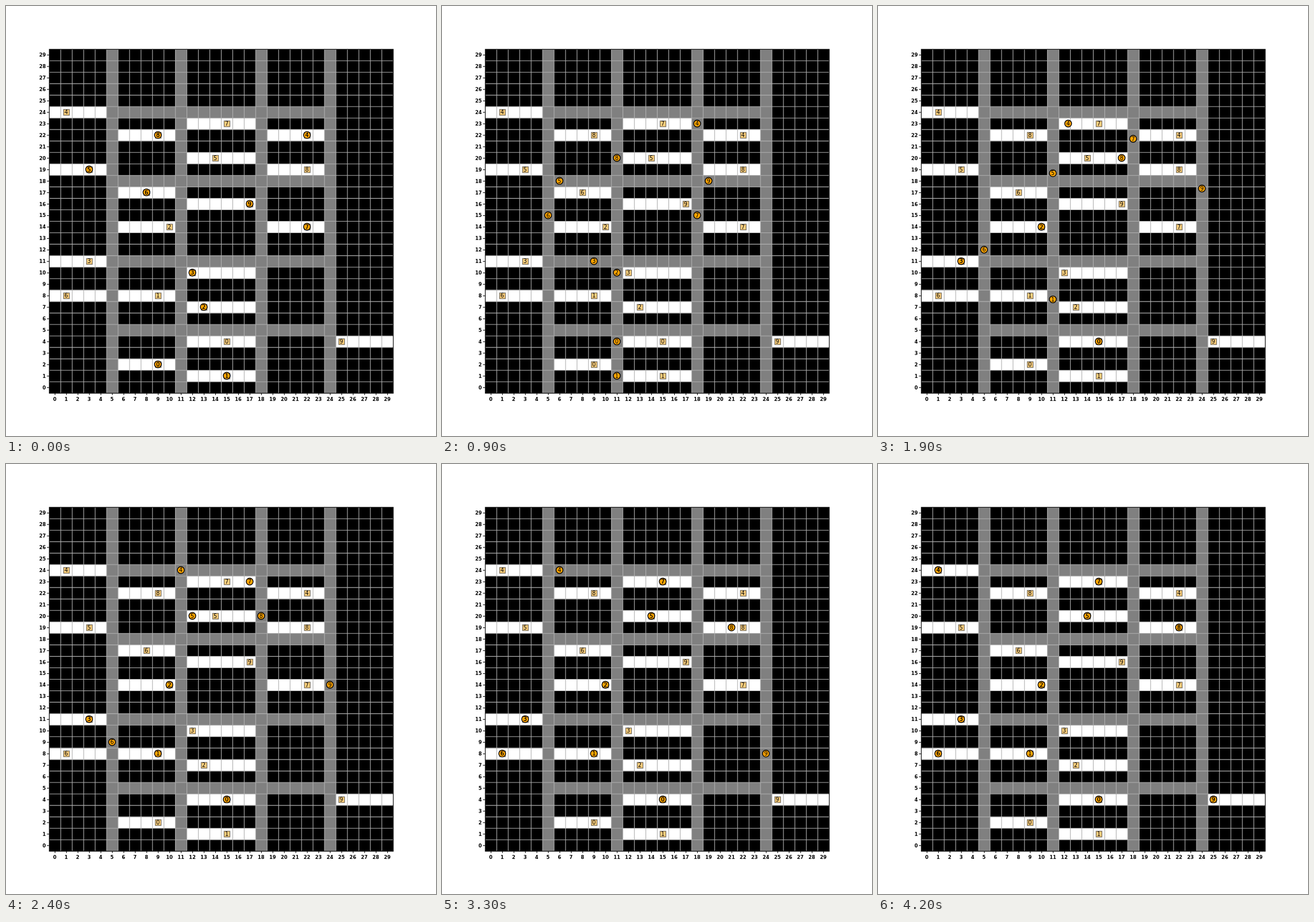
Write an HTML page with a canvas that moves like this. It is 748 px wide and 748 px high and loops after 4350 ms.

```html
<!DOCTYPE html>
<html lang="en">
<head>
<meta charset="utf-8">
<title>Grid routes</title>
<style>
html, body { margin: 0; width: 100%; height: 100%; overflow: hidden; background: #fff; }
canvas { display: block; }
</style>
</head>
<body>
<canvas id="stage" width="748" height="748"></canvas>
<script>
const ctx = document.getElementById('stage').getContext('2d');
// The board is laid out on a 750 unit square and scaled to the stage
const SIZE = 750, N = 30, CELL = 20, LEFT = 75, BOTTOM = 675;
const RIGHT = LEFT + N * CELL, TOP = BOTTOM - N * CELL;
const PT = 100 / 72;
const FRAME = 50, FRAMES_PER_STEP = 3, LOOP = 4350;
const ORANGE = '#ffa500';
const LANES = [5, 11, 18, 24];

// White bays: row, first column, last column
const BAYS = [
  [24, 0, 4], [23, 12, 17], [22, 6, 10], [22, 19, 23], [20, 12, 17],
  [19, 0, 4], [19, 19, 23], [17, 6, 10], [16, 12, 17], [14, 6, 10],
  [14, 19, 23], [11, 0, 4], [10, 12, 17], [8, 0, 4], [8, 6, 10],
  [7, 12, 17], [4, 12, 17], [4, 25, 29], [2, 6, 10], [1, 12, 17]
];

// Start cell, then moves; every turn costs one step, W is extra waiting
const ROUTES = [
  '9 2 R2 U2 R4',
  '15 1 L4 W1 U7 L2',
  '13 7 L2 U7 L1',
  '12 10 L1 U1 L8',
  '22 22 L4 U1 L7 U1 L10',
  '3 19 R2 D1 R6 U2 R3',
  '8 17 L3 D5 W4 D4 L4',
  '22 14 L4 U9 L3',
  '9 22 R2 D2 R6 W3 R1 D1 R4',
  '17 16 R1 U2 R6 D14 R1'
];
const DIRS = { L: [-1, 0], R: [1, 0], U: [0, 1], D: [0, -1], W: [0, 0] };

function buildPath(route) {
  const [c, r, ...moves] = route.split(' ');
  let x = +c, y = +r, heading = '';
  const path = [[x, y]];
  for (const move of moves) {
    const dir = move[0];
    if (dir !== 'W') {
      if (heading && heading !== dir) path.push([x, y]);
      heading = dir;
    }
    const [dx, dy] = DIRS[dir];
    for (let i = 0; i < +move.slice(1); i++) path.push([x += dx, y += dy]);
  }
  return path;
}

const paths = ROUTES.map(buildPath);
const px = c => LEFT + (c + 0.5) * CELL;
const py = r => BOTTOM - (r + 0.5) * CELL;

function position(path, step) {
  const last = path.length - 1;
  if (step >= last) return path[last];
  const i = Math.floor(step), f = step - i;
  return path[i].map((v, k) => v + (path[i + 1][k] - v) * f);
}

function fillCells(c0, r0, c1, r1, color) {
  ctx.fillStyle = color;
  ctx.fillRect(px(c0) - 9.5, py(r1) - 9.5, (c1 - c0 + 1) * CELL, (r1 - r0 + 1) * CELL);
}

function line(x0, y0, x1, y1) {
  ctx.beginPath();
  ctx.moveTo(x0, y0);
  ctx.lineTo(x1, y1);
  ctx.stroke();
}

function label(text, x, y, size, weight, align) {
  ctx.font = `${weight} ${size}px "DejaVu Sans", sans-serif`;
  ctx.textAlign = align;
  ctx.fillStyle = '#000';
  ctx.fillText(text, x, y + size * 0.365);
}

function drawBoard() {
  ctx.fillStyle = '#fff';
  ctx.fillRect(0, 0, SIZE, SIZE);
  fillCells(0, 0, N - 1, N - 1, '#000');
  for (const n of LANES) {
    fillCells(n, 0, n, N - 1, '#808080');
    fillCells(5, n, 24, n, '#808080');
  }
  for (const [r, a, b] of BAYS) fillCells(a, r, b, r, '#fff');

  // Lines sit half a unit off the cell edges
  ctx.lineWidth = 0.8 * PT;
  ctx.strokeStyle = '#b0b0b0';
  for (let i = 1; i < N; i++) {
    const d = i * CELL + 0.5;
    line(LEFT + d, TOP, LEFT + d, BOTTOM);
    line(LEFT, TOP + d, RIGHT, TOP + d);
  }
  ctx.strokeStyle = '#000';
  ctx.strokeRect(LEFT + 0.5, TOP + 0.5, N * CELL, N * CELL);
  for (let i = 0; i < N; i++) {
    const x = px(i), y = py(i);
    line(x + 0.5, BOTTOM, x + 0.5, BOTTOM + 3.5);
    line(LEFT - 3.5, y + 0.5, LEFT, y + 0.5);
    label(i, x, 685.4, 6 * PT, 'bold', 'center');
    label(i, 69.4, y + 0.4, 6 * PT, 'bold', 'right');
  }
}

function drawMark([c, r]) {
  const box = [px(c) - 4.5, py(r) - 4.5, 10, 10];
  ctx.globalAlpha = 0.5;
  ctx.fillStyle = ORANGE;
  ctx.fillRect(...box);
  ctx.strokeStyle = '#000';
  ctx.lineWidth = PT;
  ctx.strokeRect(...box);
  ctx.globalAlpha = 1;
}

function drawAgent([c, r]) {
  ctx.beginPath();
  ctx.arc(px(c), py(r), CELL * 0.3, 0, 2 * Math.PI);
  ctx.fillStyle = ORANGE;
  ctx.fill();
  ctx.strokeStyle = '#000';
  ctx.lineWidth = PT;
  ctx.stroke();
}

const drawNumber = ([c, r], id) => label(id, px(c), py(r), 7 * PT, 'normal', 'center');

function draw(time) {
  const step = Math.floor((time % LOOP) / FRAME) / FRAMES_PER_STEP;
  const spots = paths.map(p => position(p, step));
  const ends = paths.map(p => [p[0], p[p.length - 1]]);

  drawBoard();
  ends.flat().forEach(drawMark);
  spots.forEach(drawAgent);
  ends.forEach((pair, id) => pair.forEach(p => drawNumber(p, id)));
  spots.forEach(drawNumber);
}

ctx.scale(748 / SIZE, 748 / SIZE);
const start = performance.now();
function tick() {
  draw(performance.now() - start);
  requestAnimationFrame(tick);
}
tick();
</script>
</body>
</html>
```
